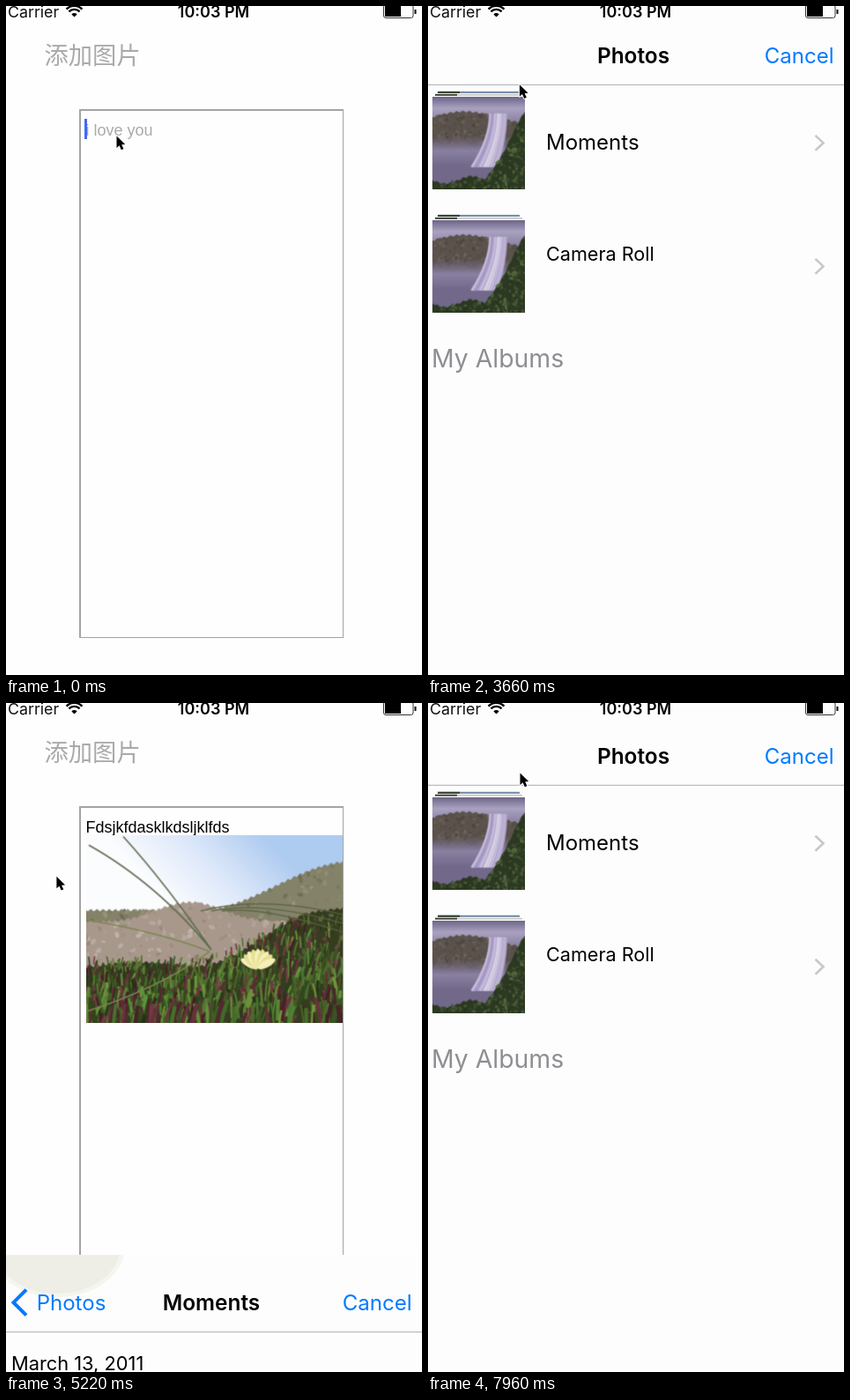
These frames come from a looping animation (472x759 px, 8000 ms). An HTML page with a canvas:

```html
<!DOCTYPE html>
<html lang="en">
<head>
<meta charset="utf-8">
<title>Photo picker</title>
<style>
  html, body { margin: 0; width: 100%; height: 100%; overflow: hidden; background: #fefefe; }
  canvas { display: block; }
</style>
</head>
<body>
<canvas id="stage" width="472" height="759"></canvas>
<script>
const W = 472, H = 759, LOOP = 8000;
const PAGE_X = -6, PAGE_W = 478, MID = 233, BAR = 87;
const PICK = 3270, PUSH = 4107, DISMISS = 5070, PICK_AGAIN = 7630;
const PAPER = '#fdfdfd', BLUE = '#007aff', GREY = '#8e8e93', EDGE = '#a4a4a4';
const UI = 'Inter, sans-serif', BODY = '"Liberation Sans", sans-serif';
const CJK = '"Noto Sans CJK SC", "Noto Sans CJK", sans-serif';
const TYPED = 'Fdsjkfdasklkdsljklfds';
const ctx = document.getElementById('stage').getContext('2d');

// ---- timing ----
const clamp = v => Math.max(0, Math.min(1, v));
const smooth = v => v * v * (3 - 2 * v);
const mix = (a, b, k) => a + (b - a) * k;
const ramp = (t, from, to) => clamp((t - from) / (to - from));

// critically damped spring from 0 to 1
function spring(ms) {
  const x = Math.max(0, ms) * 0.021;
  return 1 - Math.exp(-x) * (1 + x);
}

// each move runs from one time to another and ends at x, y
const MOVES = [
  { from: 2460, to: 2930, x: 93, y: 63 },
  { from: 3500, to: 4010, x: 137, y: 172 },
  { from: 4500, to: 4720, x: 48, y: 190 },
  { from: 5150, to: 5630, x: 198, y: 297 },
  { from: 5930, to: 6560, x: 217, y: 400 },
  { from: 6800, to: 7270, x: 92, y: 54 },
  { from: 7700, to: 7950, x: 104, y: 79 }
];

function pointerAt(t) {
  return MOVES.reduce((at, m) => {
    const k = smooth(ramp(t, m.from, m.to));
    return { x: mix(at.x, m.x, k), y: mix(at.y, m.y, k) };
  }, { x: 125, y: 147 });
}

function typedCount(t) {
  const burst = (start, gap, max) => Math.max(0, Math.min(max, 1 + Math.floor((t - start) / gap)));
  return burst(1000, 50, 11) + burst(1700, 44, 10);
}

// solid while typing, otherwise blinking once a second
function caretAlpha(t) {
  if (t >= 1000 && t < 2290) return 1;
  const phase = (t < 1000 ? t : t - 2290) % 1000;
  return 1 - ramp(phase, 420, 550) + ramp(phase, 910, 990);
}

function sheetY(t) {
  if (t < DISMISS) return H * (1 - spring(t - PICK));
  return H * (spring(t - DISMISS) - spring(t - PICK_AGAIN));
}

// ---- drawing helpers ----
function text(str, x, y, size, color, { font = UI, weight = 400, align = 'left' } = {}) {
  ctx.font = `${weight} ${size}px ${font}`;
  ctx.textAlign = align;
  ctx.fillStyle = color;
  ctx.fillText(str, x, y);
}

function rect(x, y, w, h, color, c = ctx) {
  c.fillStyle = color;
  c.fillRect(x, y, w, h);
}

function oval(c, x, y, rx, ry, color, turn = 0) {
  c.beginPath();
  c.ellipse(x, y, rx, ry, turn, 0, Math.PI * 2);
  c.fillStyle = color;
  c.fill();
}

function stroke(color, width, ...pts) {
  ctx.beginPath();
  for (const [x, y] of pts) ctx.lineTo(x, y);
  ctx.strokeStyle = color;
  ctx.lineWidth = width;
  ctx.stroke();
}

function curve(c, color, width, x0, y0, cx, cy, x1, y1) {
  c.beginPath();
  c.moveTo(x0, y0);
  c.quadraticCurveTo(cx, cy, x1, y1);
  c.strokeStyle = color;
  c.lineWidth = width;
  c.stroke();
}

function fade(c, x0, y0, x1, y1, ...colors) {
  const g = c.createLinearGradient(x0, y0, x1, y1);
  colors.forEach((col, i) => g.addColorStop(i / (colors.length - 1), col));
  return g;
}

// run draw in a shifted, optionally translucent or clipped space
function within({ x = 0, y = 0, alpha = 1, clip }, draw) {
  ctx.save();
  if (clip) {
    ctx.beginPath();
    ctx.rect(...clip);
    ctx.clip();
  }
  ctx.globalAlpha *= alpha;
  ctx.translate(x, y);
  draw();
  ctx.restore();
}

// ---- pictures: soft shapes grown from seeded noise ----
function picture(w, h, paint) {
  const layer = () => Object.assign(document.createElement('canvas'), { width: w * 2, height: h * 2 });
  const raw = layer(), soft = layer();
  const c = raw.getContext('2d'), out = soft.getContext('2d');
  let seed = 48271;
  const rnd = () => (seed = (seed * 16807) % 2147483647) / 2147483647;
  const tone = (hue, sat, light, spread) => () => `hsl(${hue},${sat}%,${light + (rnd() - 0.5) * spread}%)`;
  c.scale(2, 2);
  paint(c, rnd, tone);
  out.drawImage(raw, 0, 0);
  out.filter = 'blur(1.2px)';
  out.drawImage(raw, 0, 0);
  return soft;
}

// fill everything below top(x) and speckle it
function ground(c, rnd, w, h, top, base, tone, size) {
  c.beginPath();
  c.moveTo(0, h);
  for (let x = 0; x <= w; x++) c.lineTo(x, top(x) + Math.sin(x * 0.9) * size * 0.3);
  c.lineTo(w, h);
  c.fillStyle = base;
  c.fill();
  for (let i = 0; i < 700; i++) {
    const x = rnd() * w, y = rnd() * h, r = size * (0.3 + rnd() * 0.7);
    if (y > top(x)) oval(c, x, y, r, r * 0.6, tone(), rnd() * 3);
  }
}

const meadow = picture(291, 213, (c, rnd, tone) => {
  const rise = x => smooth(ramp(x, 130, 300));
  rect(0, 0, 291, 213, fade(c, 200, 0, 110, 90, '#aecbf0', '#dbe7f9', '#fbfcfe'), c);
  ground(c, rnd, 291, 213, x => 85 - 55 * rise(x), '#85826a', tone(55, 12, 46, 18), 4);
  ground(c, rnd, 291, 213, x => 98 - 22 * Math.sin(x / 75) ** 4, '#a8988c', tone(24, 14, 62, 18), 4);
  ground(c, rnd, 291, 213, x => 150 - 6 * Math.sin(x / 40) - 62 * rise(x * 1.15), '#363c20', tone(75, 28, 25, 16), 4);
  for (let i = 0; i < 900; i++) {
    const k = i / 900, x = rnd() * 300 - 5, top = 146 - 50 * rise(x * 1.15);
    const y = mix(top, 225, k), len = mix(9, 30, k) * (0.6 + rnd() * 0.6), lean = (rnd() - 0.35) * len * 0.6;
    const color = rnd() < 0.3 ? tone(350, 35, 27, 18) : tone(80 + rnd() * 20, 42, 28, 28);
    curve(c, color(), mix(1.5, 5, k * rnd()), x, y, x + lean * 0.2, y - len / 2, x + lean, y - len);
  }
  for (const x of [3, 42]) curve(c, '#5d6a4c', 1.6, x, 12 - x / 4, 80 + x / 4, 55, 142, 130);
  for (const y of [96, 200]) curve(c, '#7b8650', 1.6, 0, y, 85, mix(y, 132, 0.4), 140, 132);
  for (let i = 0; i < 3; i++) curve(c, '#56623f', 1.2, 130 + i * 12, 86, 200, 68 + i * 6, 291, 90 + i * 10);
  c.translate(195, 151);
  for (let i = -4; i <= 4; i++) {
    const a = i * 0.27;
    oval(c, Math.sin(a) * 11, -Math.cos(a) * 11, 4, 11, i % 2 ? '#e6df94' : '#f5f0b8', a);
  }
});

const falls = picture(100, 100, (c, rnd, tone) => {
  rect(0, 0, 100, 100, fade(c, 0, 0, 0, 25, '#6d6588', '#aaa2c0', '#8f87a6'), c);
  ground(c, rnd, 100, 100, x => 22 - 6 * Math.sin(x / 22), '#5a524c', tone(25, 10, 33, 12), 3);
  rect(0, 42, 100, 58, fade(c, 0, 42, 0, 75, 'rgba(130,120,155,0)', '#8a80a2', '#72688a'), c);
  for (let i = 0; i < 30; i++) {
    const u = i / 29;
    curve(c, tone(258, 28, 78, 22)(), 1.8, 62 + u * 18, 18, 62 + u * 18, 45, 42 + u * 28, 76);
  }
  ground(c, rnd, 100, 100, x => 90 + 4 * Math.sin(x / 9) - 1.6 * Math.max(0, x - 56), '#2c3822', tone(92, 26, 24, 18), 3);
});

const gorge = picture(100, 100, (c, rnd, tone) => {
  rect(0, 0, 100, 100, fade(c, 0, 0, 40, 40, '#6f93c4', '#bdcbdd', '#f6efe6'), c);
  ground(c, rnd, 100, 100, x => 6 + x * 0.55 + 200 * ramp(x, 47, 52), '#2b2115', tone(36, 38, 17, 16), 4);
  for (let i = 0; i < 26; i++) {
    const x = 48 + i * 2;
    curve(c, tone(30, 30, 91, 14)(), 2.4, x - 3, 27 + i * 0.2, x, 30, x + 1, 50);
  }
  rect(38, 49, 62, 51, fade(c, 0, 49, 0, 75, '#c9c4bd', '#85827c', '#68655c'), c);
  ground(c, rnd, 100, 100, x => 50 + 26 * smooth(x / 100) + 2 * Math.sin(x / 6), '#2b2413', tone(52, 48, 24, 26), 3);
});

const rapids = picture(100, 100, (c, rnd, tone) => {
  rect(0, 0, 100, 100, '#41413f', c);
  ground(c, rnd, 100, 100, () => 0, '#41413f', tone(60, 5, 26, 16), 4);
  for (let i = 0; i < 60; i++) {
    const u = i / 59, color = tone(220, 10, 86, 26);
    curve(c, color(), 2.4, 102, 8 + u * 24, 48 + u * 8, 20 + u * 34, u * 46 - 4, 102);
    if (i % 3 === 0) curve(c, color(), 2, u * 16 - 2, 0, u * 26, 40, u * 14 - 4, 100);
  }
  ground(c, rnd, 100, 100, x => 56 - (x - 45) * 0.42 + 130 * ramp(x, 47, 34), '#2c2b1b', tone(62, 38, 20, 20), 3.5);
});

// ---- screens ----
function statusBar() {
  text('Carrier', 2, 13, 17.8, '#111');
  for (const r of [2.2, 8.6, 12.6]) {
    ctx.beginPath();
    ctx.arc(77.5, 12.5, r, -Math.PI * 0.75, -Math.PI * 0.25);
    ctx.strokeStyle = '#000';
    ctx.lineWidth = r < 3 ? 4.4 : 2.4;
    ctx.stroke();
  }
  text('10:03 PM', 235.5, 13, 18, '#000', { weight: 600, align: 'center' });
  ctx.beginPath();
  ctx.roundRect(428.5, -1.5, 33.5, 15, 2.5);
  ctx.strokeStyle = '#333';
  ctx.lineWidth = 1;
  ctx.stroke();
  rect(430, 0, 18, 12, '#000');
  rect(463.5, 4, 2, 5, '#111');
}

function editor(t) {
  rect(0, 0, W, H, '#fefefe');
  text('添加图片', 43.5, 65.5, 27.3, '#aaa', { font: CJK, weight: 300 });
  rect(83, 117, 300, 600, EDGE);
  rect(85, 119, 297, 597, '#fefefe');
  const shown = TYPED.slice(0, typedCount(t));
  text(shown || 'i love you', 90.5, 146.5, 18, shown ? '#000' : '#aaa', { font: BODY });
  if (t < DISMISS) {
    const x = Math.round(89 + ctx.measureText(shown).width);
    within({ alpha: caretAlpha(t) }, () => rect(x, 128, 3, 23, '#426bf2'));
  } else {
    ctx.drawImage(meadow, 91, 150, 291, 213);
  }
}

function album(y, name, baseline, size) {
  for (const i of [0, 1]) {
    rect(11 - i * 3, y - 5 + i * 3, 93 + i * 6, 2, i ? '#c9c9c6' : '#7089a8');
    rect(11 - i * 3, y - 5 + i * 3, 25, 2, '#38402f');
  }
  rect(5, y, 106, 107, '#fff');
  ctx.drawImage(falls, 5, y + 1, 105, 105);
  text(name, 134, baseline, size, '#000');
  const tip = y + 53.5;
  stroke('#c7c7cc', 2.6, [439.5, tip - 8.5], [448.5, tip], [439.5, tip + 8.5]);
}

function albumList(t) {
  if (t >= 4060 && t < DISMISS) rect(-10, BAR + 1, 520, 133, '#d8d8d8');
  album(100, 'Moments', 161, 24);
  album(240, 'Camera Roll', 287, 21.6);
  if (t > 3800 && t < PICK_AGAIN) text('5', 134, 318, 21.6, GREY);
  text('My Albums', 4, 408, 28.4, GREY);
}

function moments() {
  rect(0, BAR + 1, PAGE_W + 10, H, PAPER);
  within({ clip: [0, 159, 119, 66] }, () =>
    ctx.drawImage(meadow, 96, 0, 426, 426, 0, 106, 119, 119));
  [gorge, rapids, falls].forEach((img, i) => ctx.drawImage(img, 0, 311 + i * 204, 119, 118));
  text('March 13, 2011', 12, 131, 21.8, '#000');
  text('Þingeyjarsveit, Norðurland eystra', 12, 272, 21.6, '#000');
  text('Aug 9, 2012 · Lómakvíavegur', 12.5, 295, 15.6, '#000');
  for (const y of [487, 692]) text('August 9, 2012', 12.5, y, 21.7, '#000');
}

function navBar(p, pageX) {
  rect(0, 0, W, BAR, PAPER);
  // a picture glows faintly through the bar
  if (p > 0) within({ x: pageX, clip: [0, 0, W, BAR] }, () => {
    oval(ctx, 64, -10, 77, 58, '#f5f5f0');
    oval(ctx, 64, -10, 72, 54, '#eeeee7');
  });
  rect(0, BAR, W, 1, '#adadad');

  const title = { weight: 600, align: 'center' };
  const backX = MID - 159 * p, arrive = ramp(p, 0.1, 1);
  within({ alpha: 1 - arrive }, () => text('Photos', backX, 63, 24.4, '#000', title));
  within({ alpha: arrive }, () => {
    text('Photos', backX, 63, 24, BLUE, { align: 'center' });
    text('Moments', MID + 200 * (1 - p), 63, 24.4, '#000', title);
    stroke(BLUE, 4, [23, 39.5], [8.5, 54], [23, 68.5]);
  });
  text('Cancel', 460.5, 63, 24, BLUE, { align: 'right' });
}

function picker(t) {
  const p = t < PICK_AGAIN ? spring(t - PUSH) : 0;
  const pageX = PAGE_X + PAGE_W * (1 - p);
  within({ y: sheetY(t) }, () => {
    rect(0, 0, W, H, PAPER);
    within({ x: -PAGE_W * 0.3 * p }, () => albumList(t));
    if (p > 0) {
      const shade = fade(ctx, pageX - 10, 0, pageX, 0, 'rgba(0,0,0,.07)', 'rgba(0,0,0,.2)');
      rect(pageX - 10, BAR + 1, 10, H, shade);
      within({ x: pageX }, moments);
    }
    navBar(p, pageX);
  });
}

const ARROW = new Path2D('M.5 .5V14L3.6 11.3L5.8 16.2L8.4 15.1L6.2 10.3L10.2 10.1Z');

function pointer(t) {
  within(pointerAt(t), () => {
    ctx.lineJoin = 'round';
    ctx.strokeStyle = '#fff';
    ctx.lineWidth = 2;
    ctx.stroke(ARROW);
    ctx.fillStyle = '#000';
    ctx.fill(ARROW);
  });
}

function frame(now) {
  const t = now % LOOP;
  editor(t);
  if (sheetY(t) < H - 0.5) picker(t);
  statusBar();
  pointer(t);
  requestAnimationFrame(frame);
}
requestAnimationFrame(frame);
</script>
</body>
</html>
```
